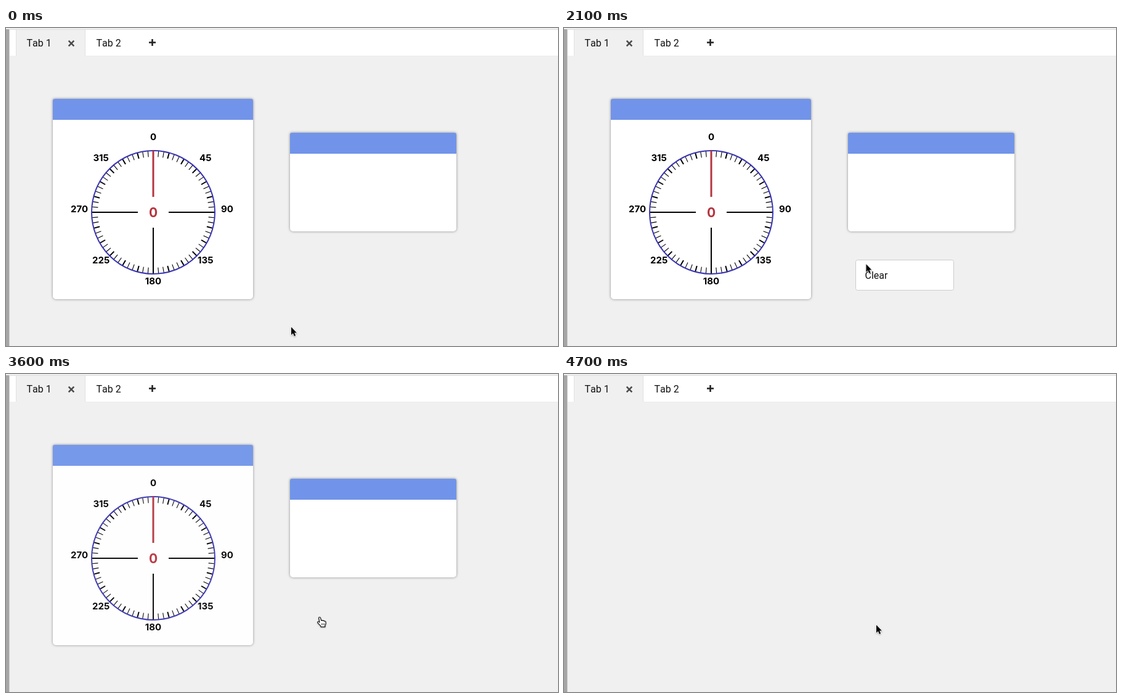
An HTML page for the animation above (4800 ms loop, 896 by 516 pixels).

```html
<!DOCTYPE html>
<html lang="en">
<head>
<meta charset="utf-8">
<title>Clearing a dashboard tab</title>
<style>
  html, body { margin: 0; width: 100%; height: 100%; overflow: hidden; background: #f0f0f0; }
  svg { display: block; width: 896px; height: 516px; }
  text { font: 16px Roboto, sans-serif; font-kerning: none; fill: #111; }
  .label { font: 700 15px Inter, sans-serif; text-anchor: middle; fill: #000; }
  .value { font: 700 21px Inter, sans-serif; text-anchor: middle; fill: #b5353f; }
  .card { filter: drop-shadow(0 0 2px rgba(0, 0, 0, .42)); }
  #arrow, #hand { filter: drop-shadow(0 1px 1px rgba(0, 0, 0, .3)); }
</style>
</head>
<body>
<svg viewBox="0 0 896 516">
  <rect width="896" height="516" fill="#f0f0f0"/>
  <rect y="2" width="896" height="43" fill="#fff"/>
  <path d="M0 2.5H896" stroke="#dedede"/>
  <path d="M129 45.5H896" stroke="#ebebeb"/>
  <rect x="16" y="3" width="113" height="43" fill="#f0f0f0"/>
  <path d="M16.5 3V45M128.5 3V45" stroke="#e0e0e0"/>
  <rect y="2" width="5" height="514" fill="#a6a6a6"/>
  <path d="M5.5 3V516" stroke="#d2d2d2"/>
  <text x="33.5" y="30">Tab 1</text>
  <text x="146.5" y="30">Tab 2</text>
  <path d="M101.7 20.7L110.3 29.3M110.3 20.7L101.7 29.3" stroke="#4b4b4b" stroke-width="2.6"/>
  <path d="M232 23.5H243M237.5 18V29" stroke="#222" stroke-width="2.6"/>

  <g id="cards">
    <g id="gauge">
      <g class="card">
        <rect x="76" y="115" width="325" height="325" rx="5" fill="#fff"/>
        <path d="M76 149V118Q76 115 79 115H398Q401 115 401 118V149Z" fill="#7194ea"/>
      </g>
      <g id="dial" transform="translate(239 299)"></g>
    </g>
    <g id="panel" class="card">
      <rect x="461" y="170" width="270" height="160" rx="5" fill="#fff"/>
      <path d="M461 204V173Q461 170 464 170H728Q731 170 731 173V204Z" fill="#7194ea"/>
    </g>
  </g>

  <g id="menu">
    <rect x="473.5" y="376.5" width="159" height="49" rx="3" fill="#fff" stroke="#ccc"/>
    <text x="488.5" y="407">Clear</text>
  </g>

  <g id="pointer">
    <path id="arrow" d="M0 .3V13L2.9 10.3L4.9 14.9L7.1 14L5.1 9.5H8.9Z"
      fill="#000" stroke="#fff" stroke-width="1.4" paint-order="stroke"/>
    <g id="hand" fill="#fff" stroke="#111" stroke-width="1.2" stroke-linejoin="round">
      <path d="M-2.4 1.8Q-2.4 .5 -1 .5Q.3 .5 .6 1.8L1.7 6.2Q3.2 5 4.3 6.4Q6 5.6 6.8 7.1Q8.8 6.7 9.1 8.6V11.6L7.9 14V16.4H1.2L.4 14.3L-4 9.8Q-4.8 8.4 -3.5 7.8Q-2.3 7.5 -1 9.1Z"/>
      <path d="M2.3 10.5V13.6M4.4 10.5V13.6M6.5 10.5V13.6" fill="none" stroke-width=".8"/>
    </g>
  </g>
</svg>
<script>
const STEP = 100, LOOP = 4800;
const MENU_OPEN = 1500, MENU_CLOSE = 3300, CLEARED = 4000;
const FADE_START = 3550, FADE_TIME = 350, STAGGER = 180;

const $ = id => document.getElementById(id);
const clamp = v => Math.min(1, Math.max(0, v));
const between = (t, from, to) => t >= from && t < to;
const show = (id, on) => { $(id).style.display = on ? '' : 'none'; };

// Smooth progress from 0 to 1 between two times.
function ease(t, from, to) {
  const k = clamp((t - from) / (to - from));
  return k * k * (3 - 2 * k);
}

function add(tag, attrs, text = '') {
  const node = document.createElementNS('http://www.w3.org/2000/svg', tag);
  for (const key in attrs) node.setAttribute(key, attrs[key]);
  node.textContent = text;
  $('dial').append(node);
}

function tick(deg, inner, width, stroke = '#000') {
  add('path', { d: `M0 ${-inner}V-100`, stroke, 'stroke-width': width, transform: `rotate(${deg})` });
}

function buildDial() {
  for (let deg = 5; deg < 360; deg += 5) {
    if (deg % 90) tick(deg, 90, deg % 15 ? 1.1 : 2);
    else tick(deg, 25, 2);
  }
  add('circle', { r: 100, fill: 'none', stroke: '#3a35b0', 'stroke-width': 2 });
  tick(0, 25, 3, '#b5353f');
  for (let deg = 0; deg < 360; deg += 45) {
    const a = deg * Math.PI / 180;
    add('text', { class: 'label', x: 120 * Math.sin(a), y: -117 * Math.cos(a) }, deg);
  }
  add('text', { class: 'value', y: 7.5 }, 0);
}

// Each move eases the pointer by an offset.
const home = { x: 463, y: 485 };
const moves = [
  { from: 0, to: 700, dx: 11, dy: -112 },
  { from: 1800, to: 2400, dx: 33, dy: 20 },
  { from: 2800, to: 3100, dx: 3, dy: 1 },
  { from: 4500, to: 4700, dx: -3, dy: 13 }
];

function placePointer(t) {
  let { x, y } = home;
  for (const { from, to, dx, dy } of moves) {
    const k = ease(t, from, to);
    x += dx * k;
    y += dy * k;
  }
  $('pointer').setAttribute('transform', `translate(${x} ${y})`);
}

function draw(t) {
  placePointer(t);
  ['gauge', 'panel'].forEach((id, i) => {
    const start = FADE_START + i * STAGGER;
    $(id).style.opacity = 1 - ease(t, start, start + FADE_TIME);
  });
  show('cards', t < CLEARED);
  show('menu', between(t, MENU_OPEN, MENU_CLOSE));
  const pointing = between(t, MENU_CLOSE, CLEARED);
  show('hand', pointing);
  show('arrow', !pointing);
}

buildDial();
draw(0);
const start = performance.now();
requestAnimationFrame(function frame() {
  const t = (performance.now() - start) % LOOP;
  draw(Math.floor(t / STEP) * STEP);
  requestAnimationFrame(frame);
});
</script>
</body>
</html>
```
